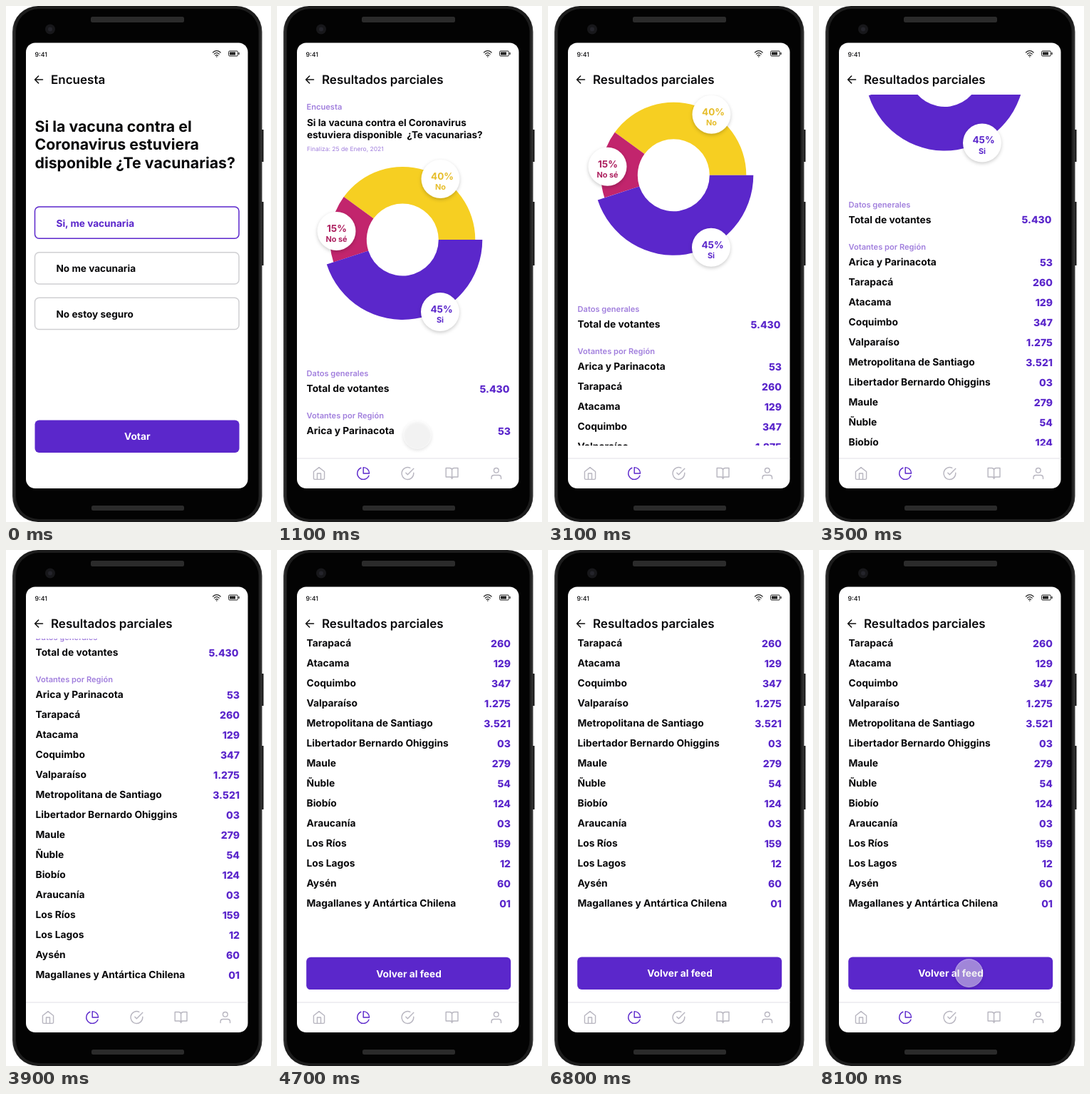
Animation, 372 px wide and 722 px high, one loop 8200 ms. Source, as an HTML page:

```html
<!DOCTYPE html>
<html lang="es">
<head>
<meta charset="utf-8">
<title>Encuesta</title>
<style>
  html, body { margin: 0; width: 100%; height: 100%; overflow: hidden; background: #fff; }
  svg { display: block; }
  text { font-family: Inter, Roboto, sans-serif; text-rendering: geometricPrecision; }
  .line { fill: none; stroke-linecap: round; stroke-linejoin: round; }
  .badge { filter: drop-shadow(0 2px 2.5px rgba(0, 0, 0, .2)); }
  #touch { filter: drop-shadow(0 2px 2px rgba(0, 0, 0, .22)); }
</style>
</head>
<body>
<svg width="372" height="722" viewBox="0 0 372 722">
  <defs>
    <linearGradient id="rim">
      <stop offset="0" stop-color="#3a3a3a"/>
      <stop offset=".012" stop-color="#1c1c1c"/>
      <stop offset=".988" stop-color="#1c1c1c"/>
      <stop offset="1" stop-color="#3a3a3a"/>
    </linearGradient>
    <clipPath id="viewport"><rect x="28" y="124" width="312" height="491"/></clipPath>
  </defs>

  <g id="phone">
    <path d="M357 173h4.5v45H357zM357 274h4.5v89H357z" fill="#151515"/>
    <rect x="9" y="0" width="350.5" height="722" rx="36" fill="url(#rim)"/>
    <rect x="14" y="4" width="340.5" height="714" rx="32" fill="#030303"/>
    <rect x="119" y="15" width="131" height="8" rx="2.5" fill="#2b2b2b"/>
    <rect x="120" y="699" width="130" height="7" rx="2.5" fill="#2b2b2b"/>
    <circle cx="62" cy="32.5" r="7" fill="#17171a"/>
    <circle cx="62" cy="32.5" r="3" fill="#24242b"/>
    <rect x="28" y="51.5" width="311.5" height="623.5" rx="13" fill="#fff"/>
  </g>

  <g id="status">
    <path class="line" d="M290.5 65q5.3-4.6 10.6 0M292.3 67.2q3.5-3 7 0M294 69.4q1.8-1.5 3.6 0" stroke="#222" stroke-width="1.2"/>
    <circle cx="295.8" cy="71" r=".8" fill="#222"/>
    <rect x="312.5" y="63" width="13" height="7" rx="1.5" fill="none" stroke="#222"/>
    <path d="M314 64.5h8v4h-8zM326.5 65h1.2v3h-1.2z" fill="#222"/>
    <path class="line" d="M51.5 103H40.8M45.6 98l-5 5 5 5" stroke="#111" stroke-width="1.6"/>
  </g>

  <g id="survey"></g>
  <g id="results">
    <g id="header"></g>
    <g clip-path="url(#viewport)"><g id="content"></g></g>
    <g id="nav"></g>
  </g>
  <circle id="touch" r="19.5" fill="rgba(255,255,255,.45)" stroke="rgba(255,255,255,.4)"/>
</svg>

<script>
const LOOP = 8200, RESULTS_AT = 1000;
const PURPLE = '#5b27cb', LILAC = '#a17fdd', YELLOW = '#f6cf22', RED = '#c2256d';
const $ = id => document.getElementById(id);

// Text placed by the vertical middle of its capitals.
const text = (x, middle, size, label, { fill = '#08080a', weight = 700, anchor = 'start' } = {}) =>
  `<text x="${x}" y="${middle + size * 0.364}" font-size="${size}" font-weight="${weight}"
    text-anchor="${anchor}" fill="${fill}">${label}</text>`;

const title = label => text(63, 103.3, 17, label, { weight: 600 });

const button = (x, y, label) =>
  `<rect x="${x}" y="${y}" width="287" height="45.5" rx="6" fill="${PURPLE}"/>` +
  text(x + 143.8, y + 22.8, 13.7, label, { fill: '#fff', anchor: 'middle' });

const option = (y, label, color, ink) =>
  `<rect x="40.5" y="${y}" width="286.5" height="44.3" rx="6" fill="#fff" stroke="${color}" stroke-width="1.5"/>` +
  text(70.5, y + 22.6, 13.6, label, { fill: ink });

// Ring sector in degrees, clockwise from the right.
function sector(from, to, radius, color) {
  const at = (angle, r) => {
    const a = angle * Math.PI / 180;
    return `${176.3 + r * Math.cos(a)} ${327 + r * Math.sin(a)}`;
  };
  const hole = 50.5;
  return `<path fill="${color}" d="M${at(from, hole)}L${at(from, radius)}A${radius} ${radius} 0 0 1 ${at(to, radius)}
    L${at(to, hole)}A${hole} ${hole} 0 0 0 ${at(from, hole)}"/>`;
}

const badge = (x, y, textX, percent, label, fill) =>
  `<circle class="badge" cx="${x}" cy="${y}" r="27" fill="#fff"/>` +
  text(textX, y - 4, 13.5, percent, { fill, anchor: 'middle' }) +
  text(x, y + 11.5, 10.9, label, { fill, anchor: 'middle' });

const row = (y, label, count, right = 328) =>
  text(41.5, y, 13.8, label) +
  text(right, y + 0.7, 14, count, { fill: PURPLE, weight: 800, anchor: 'end' });

const caption = (y, label) => text(41.5, y, 11.1, label, { fill: LILAC, weight: 600 });

const regions = [
  ['Arica y Parinacota', '53'], ['Tarapacá', '260'], ['Atacama', '129'], ['Coquimbo', '347'],
  ['Valparaíso', '1.275'], ['Metropolitana de Santiago', '3.521'],
  ['Libertador Bernardo Ohiggins', '03'], ['Maule', '279'], ['Ñuble', '54'], ['Biobío', '124'],
  ['Araucanía', '03'], ['Los Ríos', '159'], ['Los Lagos', '12'], ['Aysén', '60'],
  ['Magallanes y Antártica Chilena', '01']
];

const icons = [
  'M3 9l9-7 9 7v11a2 2 0 0 1-2 2H5a2 2 0 0 1-2-2zM9 22V12h6v10',
  'M21.2 15.9A10 10 0 1 1 8 2.8M22 12A10 10 0 0 0 12 2v10z',
  'M22 11.1V12a10 10 0 1 1-5.9-9.1M22 4L12 14l-3-3',
  'M2 3h6a4 4 0 0 1 4 4v14a3 3 0 0 0-3-3H2zM22 3h-6a4 4 0 0 0-4 4v14a3 3 0 0 1 3-3h7z',
  'M20 21v-2a4 4 0 0 0-4-4H8a4 4 0 0 0-4 4v2M16 7a4 4 0 1 1-8 0 4 4 0 0 1 8 0z'
];

$('status').innerHTML += text(40.5, 67.3, 8.8, '9:41', { weight: 500 });

$('survey').innerHTML =
  title('Encuesta') +
  ['Si la vacuna contra el', 'Coronavirus estuviera', 'disponible ¿Te vacunarias?']
    .map((line, i) => text(40.5, 168 + i * 25.7, 21.3, line)).join('') +
  option(281, 'Si, me vacunaria', PURPLE, PURPLE) +
  option(344.7, 'No me vacunaria', '#cfcfd2') +
  option(408.3, 'No estoy seguro', '#cfcfd2') +
  button(40.5, 579.5, 'Votar');

$('header').innerHTML = title('Resultados parciales');

$('content').innerHTML =
  caption(141, 'Encuesta') +
  text(42, 163.3, 13.5, 'Si la vacuna contra el Coronavirus') +
  text(42, 180.3, 13.5, 'estuviera disponible&nbsp; ¿Te vacunarias?') +
  text(42, 200.3, 8.5, 'Finaliza: 25 de Enero, 2021', { fill: LILAC, weight: 400 }) +
  sector(216, 360, 102, YELLOW) + sector(162, 216, 102, RED) + sector(0, 162, 112, PURPLE) +
  badge(229.5, 242, 232, '40%', 'No', '#e6bd2b') +
  badge(83.5, 315, 84, '15%', 'No sé', '#ad205f') +
  badge(229, 428, 231, '45%', 'Si', PURPLE) +
  caption(514, 'Datos generales') + row(535, 'Total de votantes', '5.430', 326.5) +
  caption(573, 'Votantes por Región') +
  regions.map(([name, votes], i) => row(594.2 + i * 28, name, votes)).join('') +
  button(41.2, 1061.5, 'Volver al feed');

$('nav').innerHTML =
  '<path d="M28 633H339.5" stroke="#e0dfe5"/>' +
  icons.map((d, i) => `<path class="line" d="${d}" stroke="${i === 1 ? PURPLE : '#b8b6c0'}" stroke-width="1.7"
    transform="translate(${59 + i * 62.2} 654) scale(.84) translate(-12 -12)"/>`).join('');

// Scroll keys: time, offset, speed in px per ms.
const scrollKeys = [[2350, 0, 0], [2600, 17, .13], [3100, 90, .22], [3900, 392, .27], [4750, 492, 0]];

function scrollAt(t) {
  const next = scrollKeys.findIndex(key => key[0] > t);
  if (next === 0) return 0;
  if (next < 0) return 492;
  const [t0, y0, v0] = scrollKeys[next - 1], [t1, y1, v1] = scrollKeys[next];
  const d = t1 - t0, u = (t - t0) / d, w = 1 - u;
  return w * w * ((1 + 2 * u) * y0 + u * d * v0) + u * u * ((3 - 2 * u) * y1 - w * d * v1);
}

const ramp = (t, from, to) => Math.min(1, Math.max(0, (t - from) / (to - from)));

function draw(t) {
  const voted = t >= RESULTS_AT;
  $('survey').style.display = voted ? 'none' : '';
  $('results').style.display = voted ? '' : 'none';
  $('content').setAttribute('transform', `translate(0 ${-scrollAt(t)})`);

  const leaving = t > 5000;
  const touch = $('touch');
  touch.setAttribute('cx', leaving ? 210.5 : 197);
  touch.setAttribute('cy', leaving ? 592 : 600);
  touch.style.opacity = leaving ? ramp(t, 7850, 8050) : ramp(t, 550, 750) * (1 - ramp(t, 1150, 1450));
}

function tick() {
  draw(performance.now() % LOOP);
  requestAnimationFrame(tick);
}
tick();
</script>
</body>
</html>
```
